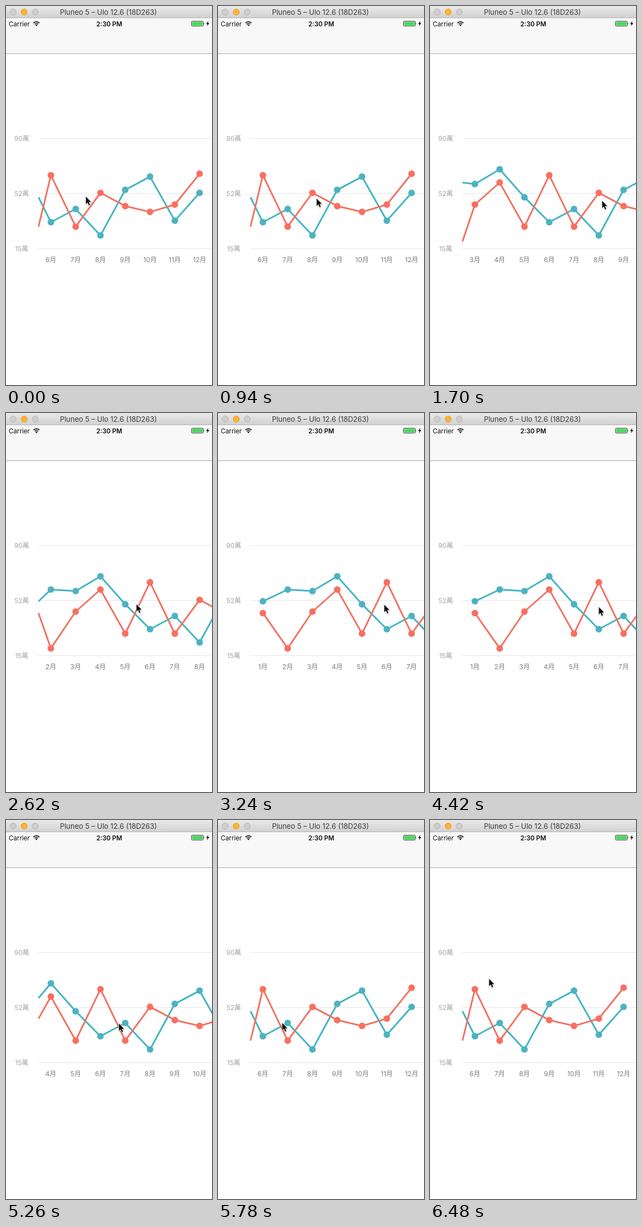
Write an HTML page that moves like this. It is 374x688 px and loops after 6500 ms.

```html
<!DOCTYPE html>
<html lang="zh-Hant">
<head>
<meta charset="utf-8">
<title>Monthly chart</title>
<style>
  html, body { margin: 0; width: 100%; height: 100%; overflow: hidden; background: #fff; }
  svg { display: block; width: 374px; height: 688px; }
  text { font: 12px Inter, "Noto Sans CJK TC", "Noto Sans CJK JP", "Noto Sans CJK", sans-serif; text-anchor: middle; }
  .title { font-size: 13px; fill: #3b3b3b; }
  .carrier { font-size: 11.7px; text-anchor: start; fill: #111; }
  .clock { font-size: 11.6px; font-weight: 600; fill: #111; }
  .scale { fill: #a3a3a3; }
  .month { fill: #7c7c7c; }
  .grid { stroke: #e6e6e6; }
  .line { fill: none; stroke-width: 3; stroke-linejoin: round; }
</style>
</head>
<body>
<svg viewBox="0 0 374 688">
  <defs>
    <linearGradient id="bar" x2="0" y2="1">
      <stop stop-color="#e9e9e9"/>
      <stop offset="1" stop-color="#d0d0d0"/>
    </linearGradient>
    <filter id="soft" x="-50%" y="-50%" width="200%" height="200%">
      <feDropShadow dx="0" dy="1" stdDeviation="1" flood-opacity=".35"/>
    </filter>
  </defs>

  <rect width="374" height="688" fill="#fff"/>
  <rect y="22" width="374" height="64" fill="#f8f8f8"/>
  <rect y="86" width="374" height="1" fill="#aaa8aa"/>
  <rect width="374" height="22" fill="url(#bar)"/>
  <rect y="21" width="374" height="1" fill="#b4b4b4"/>
  <g fill="#cecece" stroke="#b3b3b3">
    <circle cx="13" cy="11" r="5.5"/>
    <circle cx="33" cy="11" r="5.5" fill="#fdb42f" stroke="#df9c2c"/>
    <circle cx="53" cy="11" r="5.5"/>
  </g>
  <text class="title" x="186" y="15.5">Pluneo 5 – Ulo 12.6 (18D263)</text>

  <text class="carrier" x="5" y="36.5">Carrier</text>
  <g fill="none" stroke="#111" stroke-width="1.8">
    <path d="M49.8 30.9a7.7 7.7 0 0 1 10.9 0M52.1 33.2a4.5 4.5 0 0 1 6.3 0"/>
    <path d="M55.25 36.8l-1.9-2a2.7 2.7 0 0 1 3.8 0z" fill="#111" stroke="none"/>
  </g>
  <text class="clock" x="187.5" y="36.5">2:30 PM</text>
  <rect x="336.5" y="27.5" width="22" height="9" rx="1.8" fill="#fff" stroke="#222" stroke-width=".8"/>
  <rect x="337.5" y="28.5" width="20" height="7" rx=".8" fill="#4cd660"/>
  <path d="M359.3 30.3q1.4 1.7 0 3.4z" fill="#222"/>
  <path d="M367.6 27l-4.4 5.6h2.6l-1.2 4.2 4.6-5.8h-2.7z" fill="#111"/>

  <g id="axis"></g>
  <g id="chart"></g>
  <g id="cursor">
    <path transform="scale(.92)" filter="url(#soft)" d="M0 0V14.6L3.3 11.6L5.7 17.2L8.1 16.2L5.7 10.7H10.3Z"
          fill="#111" stroke="#fff" stroke-width="1.4" paint-order="stroke"/>
  </g>
</svg>
<script>
const LOOP = 6500, LEFT = 59, FIRST = 81.5, GAP = 45, SHOWN = 7, LAST_PAGE = 5;

const series = [
  { line: '#40b4c2', dot: '#4db2c1', data: [37, 45, 44, 54, 35, 18, 27, 9, 40, 49, 19, 38] },
  { line: '#f27161', dot: '#f96f60', data: [29, 5, 30, 45, 15, 50, 15, 38, 29, 25, 30, 51] }
];

// Pointer stops; a held stop starts a drag that lasts until the next one.
const stops = [
  { t: 0, x: 145, y: 346 },
  { t: 940, x: 179, y: 349.5, held: true },
  { t: 2000, x: 365, y: 355 },
  { t: 2480, x: 222, y: 347, held: true },
  { t: 3240, x: 302, y: 348 },
  { t: 3800, x: 246, y: 348 },
  { t: 4660, x: 330, y: 354, held: true },
  { t: 5680, x: 118, y: 380 },
  { t: LOOP, x: 107, y: 286 }
];

const find = id => document.getElementById(id);
const clamp = (v, lo, hi) => Math.min(hi, Math.max(lo, v));
const mix = (a, b, f) => a + (b - a) * f;
const yOf = v => 440.5 - v * 200 / 75;
const xOf = (i, page) => FIRST + (i - page) * GAP;
const label = (cls, x, y, s) => `<text class="${cls}" x="${x}" y="${y}">${s}</text>`;

find('axis').innerHTML = [90, 52, 15].map((v, i) => {
  const y = 240.5 + i * 100;
  return `<path class="grid" d="M${LEFT} ${y}H374"/>` + label('scale', 28.5, y + 4.5, v + '萬');
}).join('');

// The month before the first one shown is pinned to the left edge.
function drawSeries({ line, dot, data }, page) {
  const pts = data.map((v, i) => [Math.max(LEFT, xOf(i, page)), yOf(v)])
    .slice(Math.max(0, page - 1), page + SHOWN + 1);
  const dots = pts.filter(p => p[0] > LEFT)
    .map(([x, y]) => `<circle cx="${x}" cy="${y}" r="6" fill="${dot}"/>`);
  return `<polyline class="line" stroke="${line}" points="${pts.join(' ')}"/>` + dots.join('');
}

function drawChart(page) {
  let out = series.map(s => drawSeries(s, page)).join('');
  for (let i = page; i < page + SHOWN; i++) out += label('month', xOf(i, page), 465, i + 1 + '月');
  find('chart').innerHTML = out;
}

// Walks the stops up to time t; each drag turns the chart one month per GAP.
function stateAt(t) {
  let page = LAST_PAGE, x, y;
  for (let i = 0; i + 1 < stops.length && stops[i].t <= t; i++) {
    const a = stops[i], b = stops[i + 1];
    const f = clamp((t - a.t) / (b.t - a.t), 0, 1);
    x = mix(a.x, b.x, f);
    y = mix(a.y, b.y, f);
    if (a.held) page = clamp(page - Math.round((x - a.x) / GAP), 0, LAST_PAGE);
  }
  return { page, x, y };
}

let shown = -1;
function frame() {
  const { page, x, y } = stateAt(performance.now() % LOOP);
  if (page !== shown) drawChart(shown = page);
  find('cursor').setAttribute('transform', `translate(${x} ${y})`);
  requestAnimationFrame(frame);
}
frame();
</script>
</body>
</html>
```
